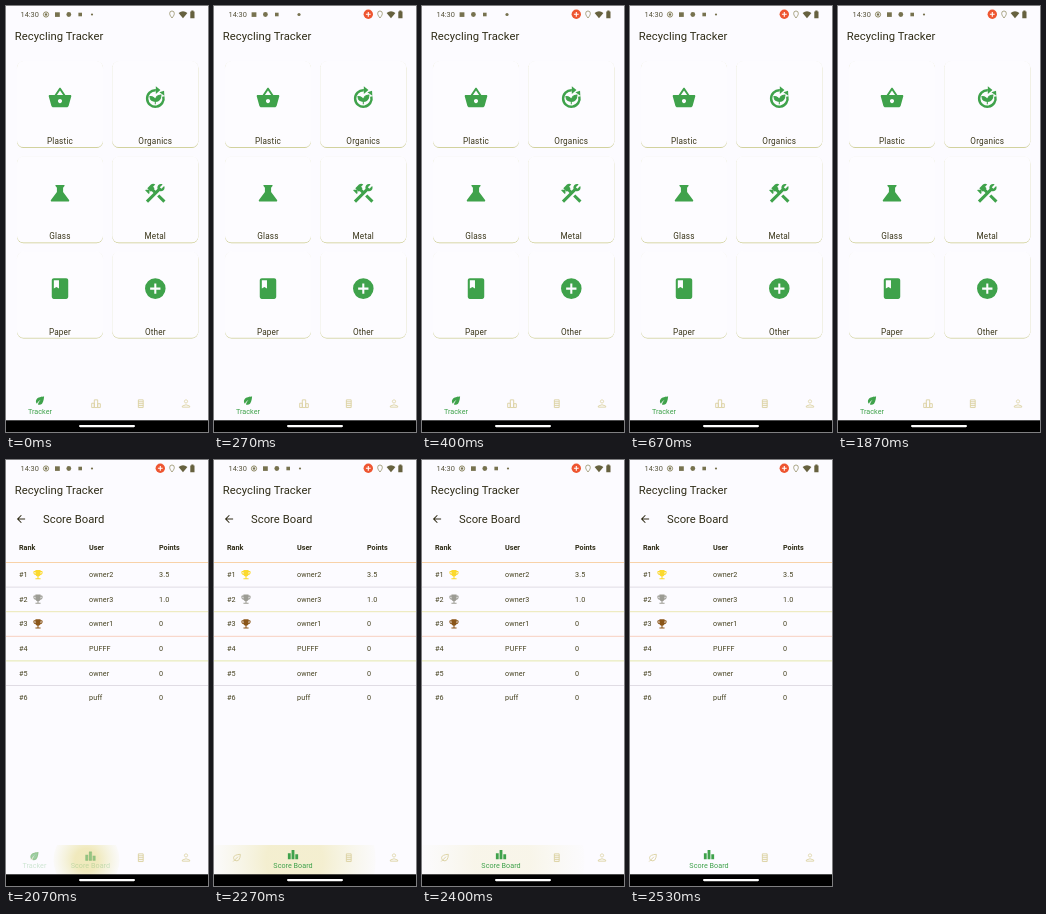
These frames come from a looping animation (202x426 px, 3340 ms). An HTML page:

```html
<!DOCTYPE html>
<html lang="en">
<head>
<meta charset="utf-8">
<title>Recycling Tracker</title>
<style>
html, body { margin: 0; width: 100%; height: 100%; overflow: hidden; background: #fcfbff; }
svg { display: block; width: 100vw; height: 100vh; font: 7.2px Roboto, Arial, sans-serif; fill: #45411f; }
.clock { font-size: 7.4px; fill: #55513a; }
.title { font-size: 11.25px; letter-spacing: .04px; fill: #302d18; }
.tile { font-size: 8.2px; letter-spacing: .18px; text-anchor: middle; fill: #3a361a; }
.head { font-weight: 600; fill: #302d18; }
.cell { letter-spacing: .12px; }
.tab { text-anchor: middle; letter-spacing: .03px; fill: #3fa24b; }
</style>
</head>
<body>
<svg id="stage" viewBox="0 0 202 426" preserveAspectRatio="none">
  <defs>
    <clipPath id="bar"><rect y="385" width="202" height="30"/></clipPath>
    <radialGradient id="soft">
      <stop offset=".35" stop-color="#e2d46c"/>
      <stop offset="1" stop-color="#e2e08c" stop-opacity=".12"/>
    </radialGradient>
  </defs>
  <rect width="202" height="426" fill="#fcfbff"/>
  <text class="clock" x="14.5" y="11">14:30</text>
  <g id="notes" fill="#77724f"></g>
  <g id="record">
    <circle r="4.7" fill="#ee5530"/>
    <path d="M-2.4 0H2.4M0-2.4V2.4" stroke="#fff" stroke-width="1.1"/>
  </g>
  <g fill="#66613f">
    <path d="M166 12C164 9.5 163.7 8.5 163.7 7.3a2.3 2.3 0 0 1 4.6 0C168.3 8.5 168 9.5 166 12z" fill="none" stroke="#a09b78" stroke-width=".9"/>
    <path d="M177 12.2L172.6 7Q177 3.4 181.4 7z"/>
    <path d="M184.3 5.5h1v-1h2.2v1h1v6.7h-4.2z"/>
  </g>
  <text class="title" x="8.8" y="34">Recycling Tracker</text>
  <g id="tracker"></g>
  <g id="scores"></g>
  <g id="nav"></g>
  <rect y="414.3" width="202" height="12" fill="#000"/>
  <rect x="73" y="419" width="56" height="2.2" rx="1.1" fill="#fff"/>
</svg>
<script>
const $ = id => document.getElementById(id);
const clamp = x => Math.min(1, Math.max(0, x));
const ramp = (t, a, b) => clamp((t - a) / (b - a));
const ease = x => x * x * (3 - 2 * x);
const mix = (a, b, p) => a + (b - a) * p;

// Icons live on a 24-unit grid.
const outline = d => `<path d="${d}" fill="none" stroke="currentColor" stroke-width="2"/>`;
const solid = d => `<path d="${d}"/>`;
const icons = {
  basket: solid('M17.21 9l-4.38-6.56c-.19-.28-.51-.42-.83-.42-.32 0-.64.14-.83.43L6.79 9H2c-.55 0-1 .45-1 1 0 .09.01.18.04.27l2.54 9.27c.23.84 1 1.46 1.92 1.46h13c.92 0 1.69-.62 1.93-1.46l2.54-9.27L23 10c0-.55-.45-1-1-1h-4.79zM9 9l3-4.4L15 9H9zm3 8c-1.1 0-2-.9-2-2s.9-2 2-2 2 .9 2 2-.9 2-2 2z'),
  compost: '<path d="M12.5 4.5A8 8 0 1 0 19.8 10.5" fill="none" stroke="currentColor" stroke-width="2.4"/>' +
    solid('M12.5 .5L17 4.3 12.5 8zM16 6.5L20.5 5 20.8 9.8z') +
    '<path d="M12 18V13M12 15Q7 15.5 6.8 10.5 11.5 10.5 12 14.5 12.5 9 17.5 9 17.5 14.8 12 15.5z" stroke="currentColor"/>',
  flask: solid('M20.8 18.4L15 10.67V6.5l1.35-1.69c.26-.33.03-.81-.39-.81H8.04c-.42 0-.65.48-.39.81L9 6.5v4.17L3.2 18.4c-.49.66-.02 1.6.8 1.6h16c.82 0 1.29-.94.8-1.6z'),
  tools: solid('M13.783 15.172l2.121-2.121 5.996 5.996-2.121 2.121zM17.5 10c1.93 0 3.5-1.57 3.5-3.5 0-.58-.16-1.12-.41-1.6l-2.7 2.7-1.49-1.49 2.7-2.7c-.48-.25-1.02-.41-1.6-.41C15.57 3 14 4.57 14 6.5c0 .41.08.8.21 1.16l-1.85 1.85-1.78-1.78.71-.71-1.41-1.41L12 3.49c-1.17-1.17-3.07-1.17-4.24 0L4.22 7.03l1.41 1.41H2.81l-.71.71 3.54 3.54.71-.71V9.15l1.41 1.41.71-.71 1.78 1.78-7.41 7.41 2.12 2.12L16.34 9.79c.36.13.75.21 1.16.21z'),
  book: solid('M18 2H6c-1.1 0-2 .9-2 2v16c0 1.1.9 2 2 2h12c1.1 0 2-.9 2-2V4c0-1.1-.9-2-2-2zM6 4h5v8l-2.5-1.5L6 12V4z'),
  plus: solid('M12 2a10 10 0 1 0 0 20 10 10 0 0 0 0-20zm5 11h-4v4h-2v-4H7v-2h4V7h2v4h4v2z'),
  cup: solid('M19 5h-2V3H7v2H5c-1.1 0-2 .9-2 2v1c0 2.55 1.92 4.63 4.39 4.94.63 1.5 1.98 2.63 3.61 2.96V19H7v2h10v-2h-4v-3.1c1.63-.33 2.98-1.46 3.61-2.96C19.08 12.63 21 10.55 21 8V7c0-1.1-.9-2-2-2zM5 8V7h2v3.82C5.84 10.4 5 9.3 5 8zm14 0c0 1.3-.84 2.4-2 2.82V7h2v1z'),
  back: solid('M20 11H7.83l5.59-5.59L12 4l-8 8 8 8 1.41-1.41L7.83 13H20v-2z'),
  leaf: solid('M6.05 8.05c-2.73 2.73-2.73 7.15-.02 9.88 1.47-3.4 4.09-6.24 7.36-7.93-2.77 2.34-4.71 5.61-5.39 9.32 2.6 1.23 5.8.78 7.95-1.37C19.43 14.47 20 4 20 4S9.53 4.57 6.05 8.05z'),
  leafThin: outline('M6.8 17.3Q2 10 9 7 13 5 19 5 19 12 16 16.5 12.5 20.5 6.8 17.3L14 10M4 20l3-3'),
  bars: solid('M7.5 21H2V9h5.5v12zm7.25-18h-5.5v18h5.5V3zM22 11h-5.5v10H22V11z'),
  barsThin: outline('M3 11h5.5v9H3zM8.5 4h7v16h-7zM15.5 12H21v8h-5.5z'),
  page: outline('M6.5 4h10v16h-10zM6 8h11M6 12h11M6 16h11'),
  person: outline('M12 4a3.5 3.5 0 1 0 .01 0zM4 20v-2.5Q12 12 20 17.5V20z')
};
const icon = (name, x, y, size, color, opacity = 1) =>
  `<g opacity="${opacity}" fill="${color}" color="${color}" transform="translate(${x} ${y}) scale(${size / 24}) translate(-12 -12)">${icons[name]}</g>`;
const text = (cls, x, y, s, opacity = 1) =>
  `<text class="${cls}" x="${x}" y="${y}" opacity="${opacity}">${s}</text>`;

const green = '#3fa24b', pale = '#ddd4a6', ink = '#302d18';

const tiles = [['Plastic', 'basket'], ['Organics', 'compost'], ['Glass', 'flask'],
  ['Metal', 'tools'], ['Paper', 'book'], ['Other', 'plus']];
$('tracker').innerHTML = tiles.map(([label, name], i) => {
  const x = 11 + i % 2 * 95.3, y = 55 + (i >> 1) * 95.3;
  const box = (dy, fill) => `<rect x="${x}" y="${y + dy}" width="86" height="86" rx="6.5" fill="${fill}"/>`;
  return box(.9, '#c9c98a') + box(.3, '#ebebd8') + box(0, '#fdfcff') +
    icon(name, x + 43, y + 37, 24.7, green) + text('tile', x + 43, y + 83, label);
}).join('');

const rows = [['owner2', '3.5', '#fbd92e'], ['owner3', '1.0', '#9c9c94'], ['owner1', '0', '#8a5518'],
  ['PUFFF', '0'], ['owner', '0'], ['puff', '0']];
const rules = ['#f8d2a8', '#e0dcE4', '#ece8b4', '#f8d0c0', '#e4e8ac', '#e0dce4'];
const columns = [13, 83, 153];
$('scores').innerHTML = icon('back', 15, 59, 12.3, ink) + text('title', 37, 62.8, 'Score Board') +
  ['Rank', 'User', 'Points'].map((s, i) => text('head', columns[i], 90.3, s)).join('') +
  rows.map(([user, points, color], i) => {
    const y = 114.6 + i * 24.6;
    return `<rect y="${y - 12.6}" width="202" height="1" fill="${rules[i]}"/>` +
      ['#' + (i + 1), user, points].map((s, k) => text('cell', columns[k], y + 2.6, s)).join('') +
      (color ? icon('cup', 32, y, 12.3, color) : '');
  }).join('');

const noteShapes = [
  '<circle r="2.6" fill="none" stroke="#8d8863"/><circle r="1.2"/>',
  '<rect x="-2.4" y="-2.2" width="4.8" height="4.6"/>',
  '<circle r="2.4"/>',
  '<rect x="-1.8" y="-1.8" width="3.6" height="3.6"/>'
];

function drawNotes(t) {
  const shift = ease(ramp(t, 70, 240)) - ease(ramp(t, 500, 650));
  $('notes').innerHTML = noteShapes.map((shape, i) => {
    const x = 40 + (i - (i && shift)) * 11.4;
    return `<g transform="translate(${x} 8.5)" opacity="${i ? 1 : 1 - shift}">${shape}</g>`;
  }).join('') + `<circle cx="${86 - shift}" cy="8.5" r="${1.1 + shift * .5}"/>`;
  $('record').setAttribute('transform', `translate(154.3 8.3) scale(${ease(ramp(t, 70, 240))})`);
}

function tab(x, on, name, label) {
  const y = mix(397.7, 394.7, on);
  return icon(name + 'Thin', x, y, 11.5, pale, 1 - on) + icon(name, x, y, 12.3, green, on) +
    text('tab', x, 407.7, label, clamp(on * 1.5 - .5));
}

function drawNav(t) {
  const p = ease(ramp(t, 1940, 2200));
  const radius = mix(16, 82, ramp(t, 2000, 2275));
  const glow = ramp(t, 1990, 2050) * mix(.45, .32, ramp(t, 2070, 2270)) * (1 - ramp(t, 2270, 2510));
  $('nav').innerHTML =
    `<circle cx="80.5" cy="400" r="${radius}" fill="url(#soft)" opacity="${glow}" clip-path="url(#bar)"/>` +
    tab(mix(34, 23, p), 1 - p, 'leaf', 'Tracker') +
    tab(mix(90, 79, p), p, 'bars', 'Score Board') +
    icon('page', 135, 397.7, 11.5, pale) + icon('person', 180, 397.5, 11, pale);
}

const start = performance.now();
function frame() {
  const t = (performance.now() - start) % 3340;
  const board = t >= 2000;
  $('tracker').style.display = board ? 'none' : '';
  $('scores').style.display = board ? '' : 'none';
  drawNotes(t);
  drawNav(t);
  requestAnimationFrame(frame);
}
frame();
</script>
</body>
</html>
```
